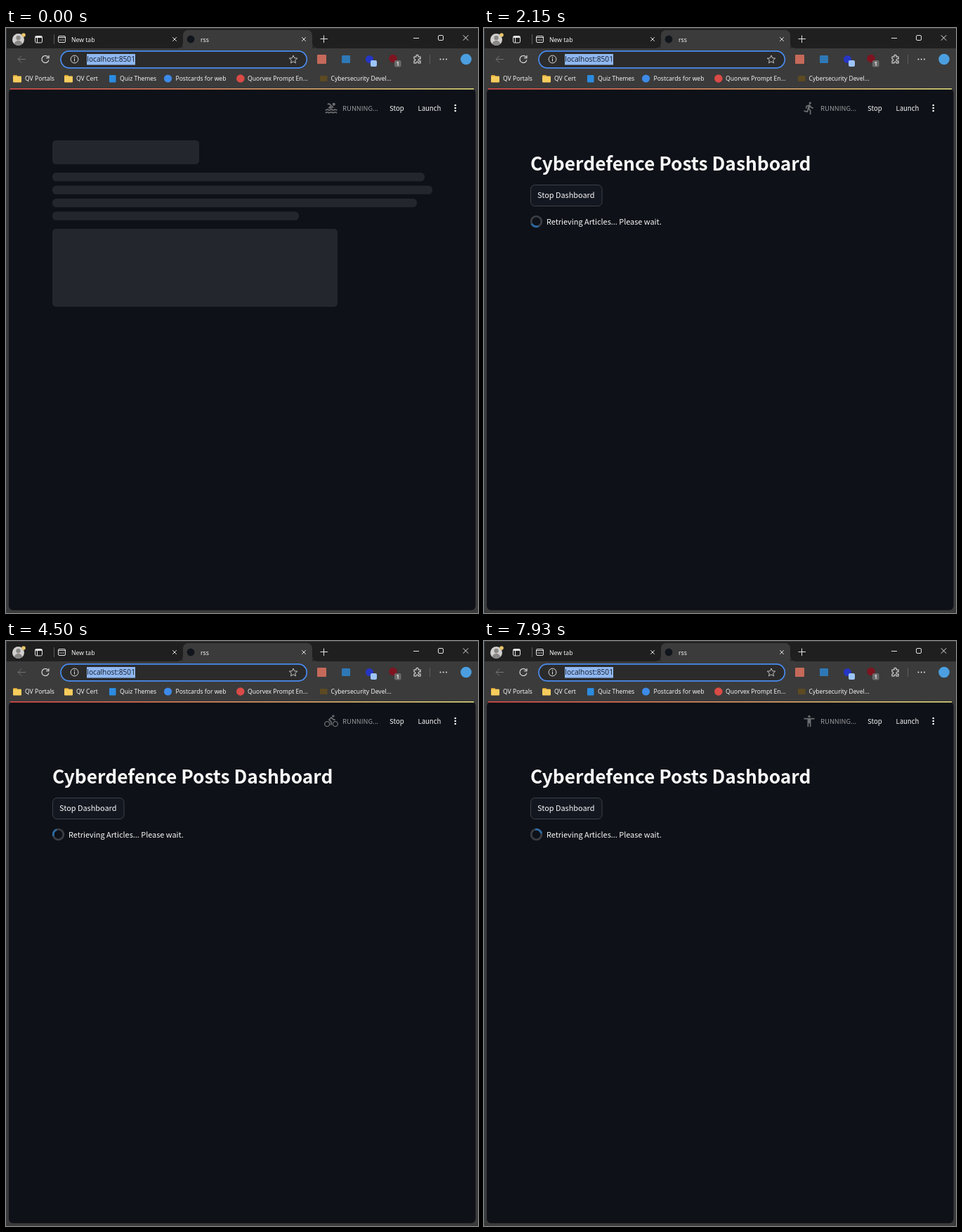
An HTML page with a canvas for the animation above (8000 ms loop, 672 by 833 pixels).

```html
<!DOCTYPE html>
<html lang="en">
<head>
<meta charset="utf-8">
<title>Dashboard</title>
<style>
  html, body { margin: 0; width: 100%; height: 100%; overflow: hidden; background: #3b3b3b; }
  canvas { display: block; width: 672px; height: 833px; }
</style>
</head>
<body>
<canvas id="stage" width="672" height="833"></canvas>
<script>
const ctx = document.getElementById('stage').getContext('2d');
const LOOP = 8000;
const UI = '"Open Sans", "Noto Sans", sans-serif';
const APP = '"Noto Sans CJK JP", "Noto Sans CJK", "Noto Sans CJK SC", "Open Sans", sans-serif';
const PAGE = '#0e1117', BAR = '#3b3b3b', INK = '#fafafa', ICON = '#e4e4e4', GREY = '#6c6e71';

function box(x, y, w, h, r, fill, stroke, lw = 1) {
  ctx.beginPath();
  ctx.roundRect(x, y, w, h, r);
  if (fill) { ctx.fillStyle = fill; ctx.fill(); }
  if (stroke) { ctx.strokeStyle = stroke; ctx.lineWidth = lw; ctx.stroke(); }
}

function dot(x, y, r, fill) {
  ctx.beginPath();
  ctx.arc(x, y, r, 0, Math.PI * 2);
  ctx.fillStyle = fill;
  ctx.fill();
}

function ring(x, y, r, color, lw, from = 0, to = Math.PI * 2) {
  ctx.beginPath();
  ctx.arc(x, y, r, from, to);
  ctx.strokeStyle = color;
  ctx.lineWidth = lw;
  ctx.stroke();
}

function line(d, color = ICON, lw = 1) {
  ctx.strokeStyle = color;
  ctx.lineWidth = lw;
  ctx.stroke(new Path2D(d));
}

function label(str, x, y, size, family, color, weight = 500) {
  ctx.font = `${weight} ${size}px ${family}`;
  ctx.fillStyle = color;
  ctx.fillText(str, x, y);
}

function cross(x, y, r) {
  line(`M${x - r} ${y - r}l${2 * r} ${2 * r}M${x + r} ${y - r}l${-2 * r} ${2 * r}`);
}

function tabs() {
  box(0, 0, 672, 833, 0, BAR);
  box(0, 0, 672, 29, 0, '#1f1f1f');
  box(252, 3, 184, 32, 7, BAR);
  line('M252 29q-5 0-6 0h6v-6q0 6-6 6M436 29h6q-6 0-6-6', BAR);
  box(0, 0, 1, 833, 0, '#35414a');
  box(0, 0, 672, 1, 0, '#3a3a3a');

  dot(17.5, 16.5, 8.5, '#d2d0ce');
  dot(17.5, 14, 3.2, '#8a8886');
  ctx.save();
  ctx.beginPath();
  ctx.arc(17.5, 16.5, 8.5, 0, Math.PI * 2);
  ctx.clip();
  dot(17.5, 23.5, 5.8, '#8a8886');
  ctx.restore();
  dot(25, 10, 2.8, '#e8c56a');

  box(41.5, 11.5, 10, 9.5, 2, null, ICON);
  box(41.5, 11.5, 10, 2.5, 1, ICON);
  box(44, 14, 1, 7, 0, ICON);
  box(68, 9, 1, 14, 0, '#5a5a5a');
  box(74.5, 11.5, 10, 9, 1.5, null, ICON);
  line('M74.5 13.5h10');
  for (const x of [77, 79.5, 82]) dot(x, 17, 0.8, ICON);
  label('New tab', 93, 19.5, 8.7, UI, '#fff');
  cross(240, 16, 2.8);

  dot(263, 16, 5.4, '#11151c');
  label('rss', 277, 19.5, 8.7, UI, '#fff');
  cross(424, 16, 2.8);
  line('M447.5 15.5h10.5M452.5 10.5v10.5');
  line('M580 14.5h8');
  box(615.5, 10.5, 7, 7, 1.5, null, ICON);
  cross(654.5, 14, 3.7);
}

function toolbar() {
  line('M28 44.5H17M22 39.5l-5 5 5 5', '#737373');
  ring(56, 44.5, 5, ICON, 1.1, 0.2, Math.PI * 1.8);
  line('M61 39v3.8h-4', ICON, 1.1);

  box(78, 32.8, 350.3, 24, 12, '#2b2b2b', '#4a8cf0', 1.7);
  ring(97.5, 44.5, 5.4, ICON, 1);
  box(97, 43.5, 1, 4, 0, ICON);
  dot(97.5, 41.8, 0.8, ICON);
  box(115, 37, 69, 15.5, 0, '#8fb8f2');
  label('localhost:8501', 115.3, 48.2, 10.2, UI, '#171c26', 400);

  let star = '';
  for (let i = 0; i < 10; i++) {
    const a = i * Math.PI / 5, r = i % 2 ? 2.8 : 6;
    star += `${i ? 'L' : 'M'}${409 + r * Math.sin(a)} ${45 - r * Math.cos(a)}`;
  }
  line(star + 'Z', '#c4c4c4');

  box(443, 38, 13, 13, 1, '#c5695a');
  box(478, 39, 12, 11, 1, '#2e78b6');
  dot(517.5, 44.5, 5.5, '#2636c4');
  box(519, 46, 9, 9, 2, '#9dc4f7');
  dot(551, 43.5, 5.7, '#7e1420');
  box(553, 46, 9.5, 9.5, 2, '#6a6a6a');
  label('1', 555.6, 53.6, 8, UI, '#fff', 600);
  line('M581 41h3q-.6-2.8 1.5-2.8T587 41h3v3q-3-.5-3 1.5t3 1.5v3h-3q.4-2-1.5-2t-1.5 2h-3v-3q2-.3 2-1.5t-2-1.5z', ICON, 1.1);
  box(603, 38, 1, 13, 0, '#5c5c5c');
  for (const x of [618.5, 622.7, 627]) dot(x, 44.5, 1, ICON);
  dot(655, 44.5, 7.8, '#4b9fe0');
}

function folder(x) {
  box(x, 67, 6, 4, 1, '#d9a02c');
  box(x, 68.5, 12, 9, 1, '#f6cc5c');
}

function bookmarks() {
  folder(10);
  folder(83);
  box(147, 67, 9.5, 10.5, 1, '#2b8be0');
  dot(230.5, 72, 5.6, '#3d8ae8');
  dot(333.8, 72, 5.8, '#d94b46');
  box(447, 68, 10.5, 8, 0, '#5d4a22');
  const names = [
    [27, 'QV Portals'], [100, 'QV Cert'], [162, 'Quiz Themes'], [241.5, 'Postcards for web'],
    [344, 'Quorvex Prompt En...'], [462.5, 'Cybersecurity Devel...'],
  ];
  for (const [x, s] of names) label(s, x, 75.3, 8.6, UI, '#fff');
}

function page() {
  box(4, 86.5, 664.5, 742.5, 6, PAGE);
  const g = ctx.createLinearGradient(4, 0, 668, 0);
  g.addColorStop(0, '#ee4f4d');
  g.addColorStop(1, '#eeea80');
  box(6, 86, 660, 1.5, 0, g);
  label('RUNNING...', 479, 117.8, 9.55, APP, '#9a9b9e', 400);
  label('Stop', 546, 117.8, 9.55, APP, INK);
  label('Launch', 586.5, 117.8, 9.55, APP, INK);
  for (const y of [110, 114, 118]) dot(639.7, y, 1.35, INK);
}

function skeleton() {
  const tone = '#24262d';
  box(66, 160, 209, 34, 5, tone);
  [530, 541, 519, 351].forEach((w, i) => box(66, 206 + i * 18.5, w, 12.3, 5.5, tone));
  box(66, 286, 406, 111, 5, tone);
}

function heading() {
  label('Cyberdefence Posts Dashboard', 66, 203.3, 26.3, APP, INK, 700);
  box(66.5, 223.5, 101.5, 30, 6, '#131720', '#3d4046');
  label('Stop Dashboard', 76, 242.3, 10.9, APP, INK);
}

function spinner(t) {
  const STEP = 69.7;
  const held = 525 + Math.floor((t - 525) / STEP) * STEP;
  const mid = ((held - 1390) / 1045 - 0.4) * Math.PI * 2;
  ring(74.5, 275.5, 7.3, '#3a3d42', 2.8);
  ring(74.5, 275.5, 7.3, '#2c69a3', 2.8, mid - Math.PI / 4, mid + Math.PI / 4);
  label('Retrieving Articles... Please wait.', 89, 279.8, 10.9, APP, INK);
}

// Activity icons on a 24-unit grid, in cycle order.
const icons = [
  function row() {
    dot(15, 3, 2, GREY);
    line('M4.7 19.8l3.9-3.9h1.8M7 11.4q3.6-.2 6.6-3.8M9 11.8l9 9', GREY, 2.1);
    ctx.fill(new Path2D('M12.5 7q4-2.5 4.5 1.5v6l-1 1.6-3.5-3.6zM15 20h5.6l-2.6 4-3-3z'));
  },
  function stand() {
    dot(12, 4, 2, GREY);
    ctx.fill(new Path2D('M21 9h-6v13h-2v-6h-2v6H9V9H3V7h18z'));
  },
  function bike() {
    dot(15.5, 3.5, 2, GREY);
    ring(5, 17, 4.2, GREY, 1.6);
    ring(19, 17, 4.2, GREY, 1.6);
    line('M19 10q-3.2 0-5-2l-1.8-2L8.3 9.8l3.7 3.6V19', GREY, 2);
  },
  function run() {
    dot(13.5, 3.5, 2, GREY);
    line('M19 12q-3.5 0-5.3-3.5L12.2 7 7 9v4M12.6 8l-1 6 2.4 2v7M11.2 8L9 18.2 3 17', GREY, 2);
  },
  function ride() {
    ring(5, 14, 4, GREY, 2);
    ring(19, 14, 4, GREY, 2);
    line('M5 14h6.2l5-5M5 10h12M11 6h4l4.5 4.5', GREY, 2);
  },
  function swim() {
    dot(16.5, 5.5, 2.5, GREY);
    const wave = 'c1.7 0 1.7-1 3.3-1s1.7 1 3.4 1 1.7-1 3.3-1 1.7 1 3.3 1 1.7-1 3.4-1 1.7 1 3.3 1';
    line('M2 20' + wave + 'M2 15.5' + wave, GREY, 2);
    line('M5.8 5.6q2.2-1.6 3.8 0l6 6', GREY, 2.3);
    ctx.fill(new Path2D('M10 8l4.5 4.5-2.5 0-2 .8-2-1-2 .2z'));
  },
];

function activity(t) {
  const slot = Math.floor((t - 118) / (1255 / 6));
  ctx.save();
  ctx.translate(453, 104);
  ctx.scale(0.833, 0.833);
  icons[(slot + 6) % 6]();
  ctx.restore();
}

function draw(t) {
  tabs();
  toolbar();
  bookmarks();
  page();
  activity(t);
  if (t < 70) skeleton();
  else heading();
  if (t >= 540) spinner(t);
}

const start = performance.now();
function tick() {
  draw((performance.now() - start) % LOOP);
  requestAnimationFrame(tick);
}
tick();
</script>
</body>
</html>
```
